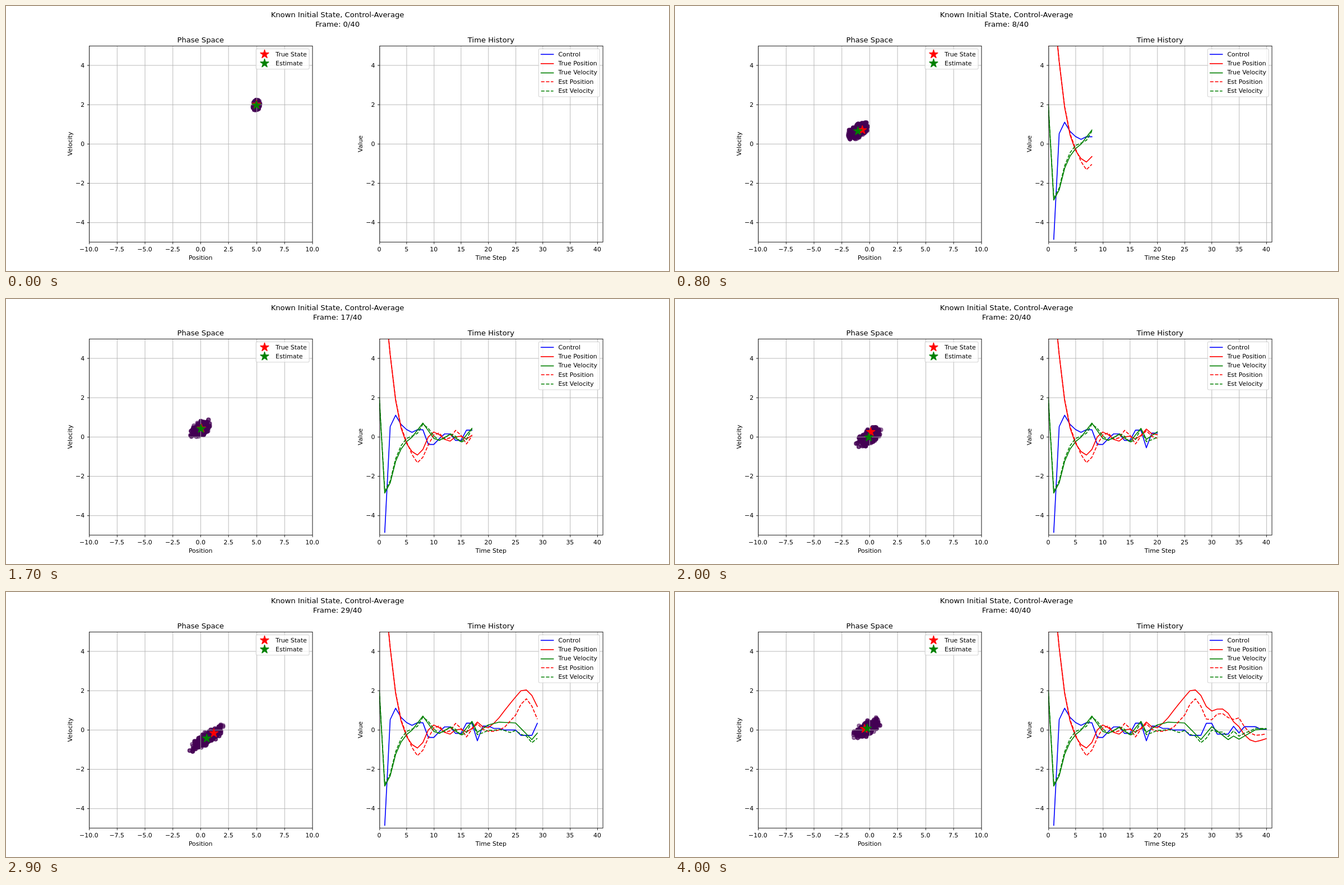
Animation, 1183 px wide and 473 px high, one loop 4100 ms. Source, as an HTML page with a canvas:

```html
<!DOCTYPE html>
<html lang="en">
<head>
<meta charset="utf-8">
<title>Phase Space and Time History</title>
<style>
html, body { margin: 0; width: 100%; height: 100%; overflow: hidden; background: #fff; }
canvas { display: block; }
</style>
</head>
<body>
<canvas id="stage" width="1183" height="473"></canvas>
<script>
const ctx = document.getElementById('stage').getContext('2d');

// The figure is laid out at 1500 x 600 and scaled to the stage
const FIG_W = 1500, FIG_H = 600, PT = 100 / 72;
const TOP = 90, BOTTOM = 534, WIDTH = FIG_W * .775 / 2.3;
const STEPS = 40, STEP_MS = 100;
const RED = '#ff0000', GREEN = '#008000', BLUE = '#0000ff', PURPLE = '#440154';

// Feedback gains on position and velocity
const GAIN_X = .45, GAIN_V = 1.33;

// Key points as [step, value], joined by straight lines
const velocityKeys = [
  [0, 2], [1, -2.87], [2, -2.35], [3, -1.25], [4, -.62], [5, -.25], [6, -.02], [8, .7],
  [10, -.08], [11, -.18], [13, .12], [15, -.25], [17, .43], [18, -.13], [20, .25], [22, .39],
  [25, .35], [28, -.5], [30, .16], [33, -.5], [34, -.32], [35, -.48], [38, 0], [40, .05]
];
const driftKeys = [
  [0, 0], [3, .07], [7, -.57], [13, -.92], [17, -.52], [20, -.85], [27, -1.04], [31, -1.29],
  [40, -.7]
];
const errorKeys = [
  [0, 0], [5, .09], [7, -.39], [9, -.4], [11, .09], [12, 0], [14, .33], [16, -.25], [17, -.04],
  [20, -.18], [23, -.85], [25, -.93], [27, -.45], [29, -.64], [31, -.25], [33, -.22],
  [35, .45], [40, .24]
];
const spreadKeys = [[0, 3.2], [4, 10], [17, 9.5], [29, 17.5], [40, 13]];

function along(keys, t) {
  const i = keys.findIndex(k => k[0] >= t);
  if (i < 0) return keys[keys.length - 1][1];
  if (i === 0) return keys[0][1];
  const [t0, v0] = keys[i - 1], [t1, v1] = keys[i];
  return v0 + (v1 - v0) * (t - t0) / (t1 - t0);
}

const control = [], truePos = [], trueVel = [], estPos = [], estVel = [];

// Position sums velocity; control is the change of velocity, set by feedback on the estimate
function simulate() {
  let travelled = 5;
  for (let t = 0; t <= STEPS; t++) {
    const v = along(velocityKeys, t), push = along(velocityKeys, t + 1) - v;
    trueVel[t] = v;
    truePos[t] = travelled + along(driftKeys, t);
    estPos[t] = truePos[t] + along(errorKeys, t);
    estVel[t] = -(push + GAIN_X * estPos[t]) / GAIN_V;
    control[t + 1] = push;
    travelled += v;
  }
}

const series = [
  { name: 'Control', data: control, color: BLUE, start: 1 },
  { name: 'True Position', data: truePos, color: RED, start: 0 },
  { name: 'True Velocity', data: trueVel, color: GREEN, start: 0 },
  { name: 'Est Position', data: estPos, color: RED, start: 0, dash: true },
  { name: 'Est Velocity', data: estVel, color: GREEN, start: 0, dash: true }
];
const values = (from, by, n) => Array.from({ length: n }, (_, i) => from + by * i);
const yTicks = values(-4, 2, 5);
const phase = {
  left: 187.5, min: -10, max: 10, ticks: values(-10, 2.5, 9), digits: 1,
  title: 'Phase Space', xLabel: 'Position', yLabel: 'Velocity'
};
const history = {
  left: 187.5 + 1.3 * WIDTH, min: 0, max: 41, ticks: values(0, 5, 9), digits: 0,
  title: 'Time History', xLabel: 'Time Step', yLabel: 'Value'
};

const snap = v => Math.round(v) + .5;
const xOf = (ax, v) => ax.left + (v - ax.min) / (ax.max - ax.min) * WIDTH;
const yOf = v => (TOP + BOTTOM) / 2 - v * (BOTTOM - TOP) / 10;
const label = (v, digits) => v.toFixed(digits).replace('-', '\u2212');

function text(str, x, y, size = 10, align = 'center') {
  ctx.font = `${size * PT}px "DejaVu Sans", sans-serif`;
  ctx.textAlign = align;
  ctx.fillStyle = '#000';
  ctx.fillText(str, x, y);
}

function line(x1, y1, x2, y2, color, width) {
  ctx.strokeStyle = color;
  ctx.lineWidth = width * PT;
  ctx.beginPath();
  ctx.moveTo(x1, y1);
  ctx.lineTo(x2, y2);
  ctx.stroke();
}

function setDash(on) {
  ctx.setLineDash(on ? [5.55 * PT, 2.4 * PT] : []);
  ctx.lineCap = on ? 'butt' : 'square';
}

function resetLine() {
  ctx.setLineDash([]);
  ctx.lineCap = 'butt';
}

function clipTo(ax) {
  ctx.save();
  ctx.beginPath();
  ctx.rect(ax.left, TOP, WIDTH, BOTTOM - TOP);
  ctx.clip();
}

function star(x, y, color) {
  ctx.beginPath();
  for (let i = 0; i < 10; i++) {
    const r = 7.5 * PT * (i % 2 ? .382 : 1), a = i * Math.PI / 5;
    ctx.lineTo(x + r * Math.sin(a), y - r * Math.cos(a));
  }
  ctx.closePath();
  ctx.fillStyle = ctx.strokeStyle = color;
  ctx.lineWidth = PT;
  ctx.lineJoin = 'bevel';
  ctx.fill();
  ctx.stroke();
}

function randomFrom(seed) {
  let s = seed * 7919 + 12345;
  return () => {
    s = (s + 0x6D2B79F5) | 0;
    let r = Math.imul(s ^ (s >>> 15), 1 | s);
    r = (r + Math.imul(r ^ (r >>> 7), 61 | r)) ^ r;
    return ((r ^ (r >>> 14)) >>> 0) / 4294967296;
  };
}

function particle(x, y) {
  ctx.beginPath();
  ctx.arc(x, y, 3 * PT, 0, 2 * Math.PI);
  ctx.fill();
  ctx.stroke();
}

function drawCloud(step) {
  const sx = along(spreadKeys, step), sy = 3.2 + .52 * sx, rho = Math.min(.85, sx / 19);
  const cx = xOf(phase, estPos[step]), cy = yOf(estVel[step]);
  const rand = randomFrom(step + 1);
  ctx.fillStyle = ctx.strokeStyle = PURPLE;
  ctx.lineWidth = 1.5 * PT;
  ctx.globalAlpha = .5;
  for (let i = 0; i < 330; i++) {
    const r = Math.sqrt(-2 * Math.log(.035 + .965 * rand())), a = 2 * Math.PI * rand();
    const u = r * Math.cos(a), v = rho * u + Math.sqrt(1 - rho * rho) * r * Math.sin(a);
    // Resampling leaves some particles stacked
    for (let n = 1 + Math.floor(2.2 * rand()); n > 0; n--) particle(cx + sx * u, cy - sy * v);
  }
  ctx.globalAlpha = 1;
}

function drawGrid(ax) {
  for (const v of ax.ticks) {
    const x = snap(xOf(ax, v));
    line(x, TOP, x, BOTTOM, '#b0b0b0', .8);
  }
  for (const v of yTicks) {
    const y = snap(yOf(v));
    line(ax.left, y, ax.left + WIDTH, y, '#b0b0b0', .8);
  }
}

function drawFrame(ax) {
  const left = snap(ax.left), right = snap(ax.left + WIDTH);
  const top = snap(TOP), bottom = snap(BOTTOM), mid = ax.left + WIDTH / 2;
  ctx.strokeStyle = '#000';
  ctx.lineWidth = .8 * PT;
  ctx.lineJoin = 'miter';
  ctx.strokeRect(left, top, right - left, bottom - top);
  for (const v of ax.ticks) {
    const x = xOf(ax, v);
    line(snap(x), bottom, snap(x), bottom + 3.5 * PT, '#000', .8);
    text(label(v, ax.digits), x, 555);
  }
  for (const v of yTicks) {
    const y = yOf(v);
    line(left, snap(y), left - 3.5 * PT, snap(y), '#000', .8);
    text(label(v, 0), ax.left - 7 * PT, Math.round(y + 5), 10, 'right');
  }
  text(ax.title, mid, 82, 12);
  text(ax.xLabel, mid, 574);
  ctx.save();
  ctx.translate(Math.round(ax.left - 39), yOf(0));
  ctx.rotate(-Math.PI / 2);
  text(ax.yLabel, 0, 0);
  ctx.restore();
}

function legendBox(ax, width, height) {
  const right = ax.left + WIDTH - 5 * PT;
  ctx.beginPath();
  ctx.roundRect(right - width, TOP + 5 * PT, width, height, 2 * PT);
  ctx.globalAlpha = .8;
  ctx.fillStyle = '#fff';
  ctx.strokeStyle = '#ccc';
  ctx.lineWidth = PT;
  ctx.fill();
  ctx.stroke();
  ctx.globalAlpha = 1;
  return right - width + 4 * PT;
}

function drawLegends() {
  const rowY = i => 109.2 + 20.7 * i;
  const name = (str, x, i) => text(str, x + 28 * PT, Math.round(rowY(i) + 4.8), 10, 'left');

  const starX = legendBox(phase, 120.4, 46);
  [['True State', RED], ['Estimate', GREEN]].forEach(([str, color], i) => {
    star(starX + 10 * PT, rowY(i), color);
    name(str, starX, i);
  });

  const lineX = legendBox(history, 138, 108.5);
  series.forEach((s, i) => {
    setDash(s.dash);
    line(lineX, snap(rowY(i)), lineX + 20 * PT, snap(rowY(i)), s.color, 1.5);
    resetLine();
    name(s.name, lineX, i);
  });
}

function drawSeries(s, step) {
  ctx.beginPath();
  for (let i = s.start; i <= step; i++) ctx.lineTo(xOf(history, i), yOf(s.data[i]));
  ctx.strokeStyle = s.color;
  ctx.lineWidth = 1.5 * PT;
  ctx.lineJoin = 'round';
  setDash(s.dash);
  ctx.stroke();
  resetLine();
}

function draw(step) {
  ctx.fillStyle = '#fff';
  ctx.fillRect(0, 0, FIG_W, FIG_H);

  clipTo(phase);
  drawCloud(step);
  drawGrid(phase);
  star(xOf(phase, truePos[step]), yOf(trueVel[step]), RED);
  star(xOf(phase, estPos[step]), yOf(estVel[step]), GREEN);
  ctx.restore();

  clipTo(history);
  drawGrid(history);
  if (step > 0) series.forEach(s => drawSeries(s, step));
  ctx.restore();

  drawFrame(phase);
  drawFrame(history);
  drawLegends();
  text('Known Initial State, Control-Average', FIG_W / 2, 26, 12);
  text(`Frame: ${step}/${STEPS}`, FIG_W / 2, 47, 12);
}

let shown = -1;
function tick() {
  const step = Math.floor(performance.now() / STEP_MS) % (STEPS + 1);
  if (step !== shown) draw(shown = step);
  requestAnimationFrame(tick);
}

ctx.scale(1183 / FIG_W, 473 / FIG_H);
simulate();
tick();
</script>
</body>
</html>
```
